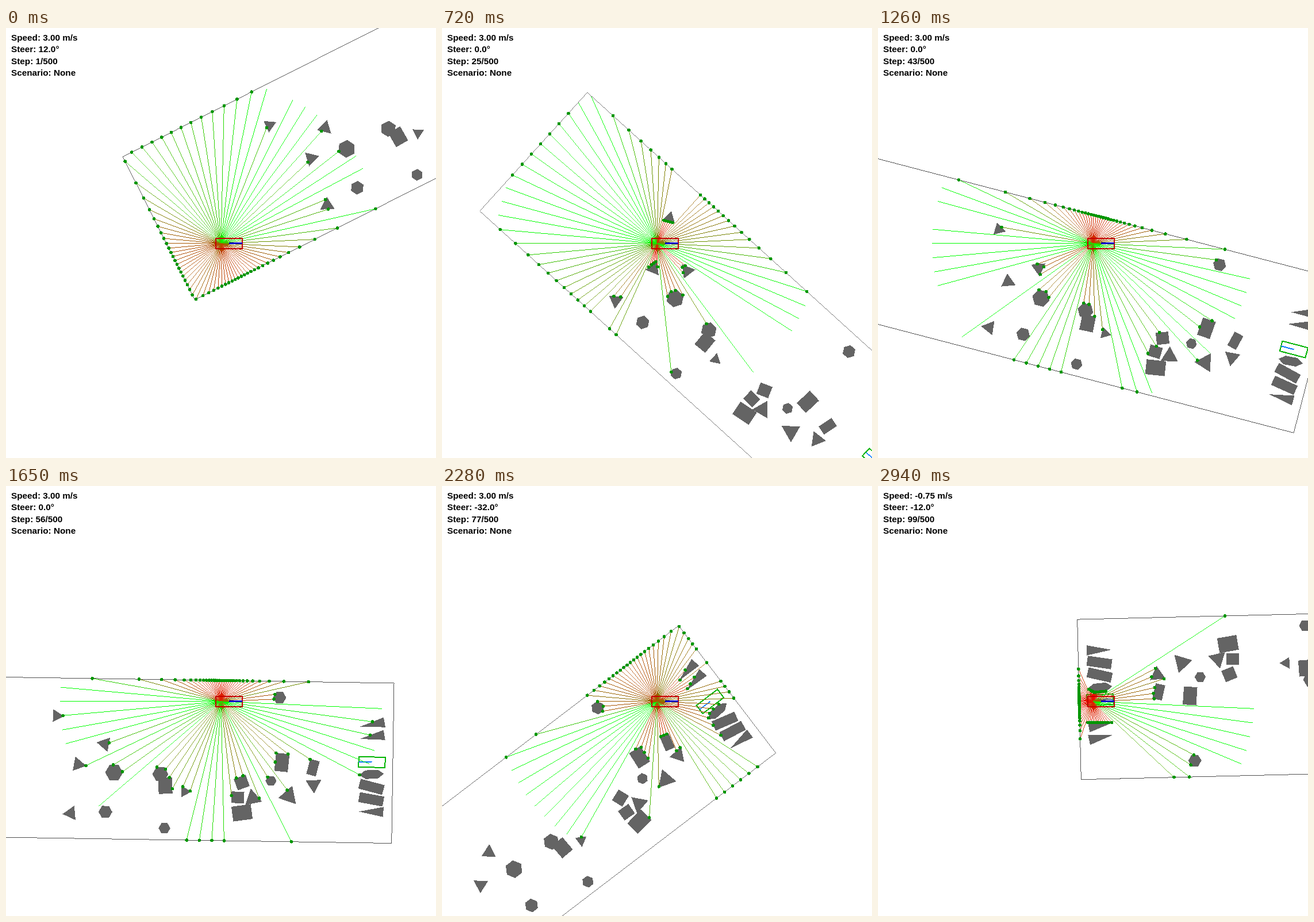
Write an HTML page that moves like this. It is 748 px wide and 748 px high and loops after 2.97 s.

```html
<!DOCTYPE html>
<html lang="en">
<head>
<meta charset="utf-8">
<title>Parking simulation</title>
<style>
  html, body { margin: 0; width: 100%; height: 100%; overflow: hidden; background: #fff; }
  svg { display: block; }
  text { font: bold 15.3px "Liberation Sans", Arial, sans-serif; white-space: pre; }
</style>
</head>
<body>
<svg id="stage" width="748" height="748" shape-rendering="crispEdges"></svg>
<script>
const stage = document.getElementById('stage');
const STEPS = 99, STEP_MS = 30;
const PX_PER_SPEED = 9.32 / 3;         // pixels driven per step at 1 m/s
const CRUISE = 9.32;                   // pixels driven per step at full speed
const LOT = [838.6, 278.6];
const RAYS = 71, RANGE = 280;
const CAR = [374, 374.9];              // rear axle on the stage
const rad = d => d * Math.PI / 180;
const mix = (a, b, u) => a + (b - a) * u;

// Easing of the distance driven between two key poses
const steady = u => u;
const brake = u => u * (2 - u);
const shunt = u => { const w = 2 * u - 1; return 0.5 + w * (4 - Math.abs(w) ** 3) / 6; };

// Key poses of the rear axle in the lot; a negative travel is driven in reverse.
const key = (step, x, y, heading, steer, travel, ease = steady) =>
  ({ step, x, y, heading, steer, travel, ease });
const route = [
  key(1, 84.7, 211.6, 26.75, 12),
  key(25, 266.3, 113.3, -42.2, 0),
  key(43, 417.6, 48.1, -14.63, 0),
  key(56, 538.1, 36.6, -0.88, 0),
  key(68, 648.9, 52.7, 5.3, -2),
  key(86, 755.4, 148, 105.7, -30, 14, brake),
  key(89, 750.6, 161.2, 113, 0, -76, shunt),
  key(99, 814.7, 135.2, 181.37, -12)
];

// A cubic through the key poses, tangent to each heading
function driveTo(n) {
  const i = Math.max(1, route.findIndex(k => k.step >= n));
  const a = route[i - 1], b = route[i], steps = b.step - a.step;
  const travel = a.travel ?? CRUISE * steps, gear = Math.sign(travel);
  const u = (n - a.step) / steps, p = a.ease(u);
  const axis = (p0, p1, trig) => {
    const d = p1 - p0, t0 = travel * trig(rad(a.heading)), t1 = travel * trig(rad(b.heading));
    const c2 = 3 * d - 2 * t0 - t1, c3 = t0 + t1 - 2 * d;
    return [p0 + p * (t0 + p * (c2 + p * c3)), t0 + p * (2 * c2 + 3 * p * c3)];
  };
  const [x, dx] = axis(a.x, b.x, Math.cos), [y, dy] = axis(a.y, b.y, Math.sin);
  const bend = -3 * gear * (b.heading - a.heading) / steps;
  return {
    x, y,
    heading: Math.atan2(gear * dy, gear * dx),
    speed: Math.round(4 * travel * (p - a.ease(u - 1 / steps)) / PX_PER_SPEED) / 4,
    steer: 2 * Math.round((mix(a.steer, b.steer, u) + bend * Math.sin(Math.PI * u)) / 2)
  };
}

// Outlines in a unit box: triangle pointing left, square, hexagon
const outlines = {
  3: [[-0.5, 0], [0.5, -0.5], [0.5, 0.5]],
  4: [[-0.5, -0.5], [0.5, -0.5], [0.5, 0.5], [-0.5, 0.5]],
  6: [0, 1, 2, 3, 4, 5].map(k => [Math.cos(rad(60 * k)) / 2, Math.sin(rad(60 * k)) / 2])
};

function shape(sides, x, y, w, h, turn = 0) {
  const c = Math.cos(rad(turn)), s = Math.sin(rad(turn));
  return outlines[sides].map(([px, py]) =>
    [x + px * w * c - py * h * s, y + px * w * s + py * h * c]);
}

const walls = shape(4, LOT[0] / 2, LOT[1] / 2, ...LOT);
const obstacles = [
  // triangles: x, y, side, turn
  ...[[256, 66, 22, 182], [333.4, 112.8, 25, 10], [289, 152.5, 25, -50], [276.2, 235.4, 25, -6],
    [480.2, 194.2, 20, 180], [595, 200, 30, 78], [654, 200, 32.6, -12], [701.8, 182.7, 27, -94]
  ].map(([x, y, side, turn]) => shape(3, x, y, side * 0.866, side, turn)),
  // boxes: x, y, width, height, turn
  ...[[443.5, 184.5, 24, 28, -3], [569.7, 203, 22, 20, 2], [576.3, 177, 22, 21, -21],
    [577.6, 229.6, 34, 26, -8.5], [645.7, 141, 23.5, 31.5, 5], [699.9, 149.2, 17, 27, 14]
  ].map(box => shape(4, ...box)),
  // hexagons: x, y, diameter
  ...[[354, 163, 31], [340, 231.7, 24], [434.5, 164.5, 28], [443, 258.4, 20.6],
    [627.2, 173.3, 19.4], [640, 28.2, 23]
  ].map(([x, y, size]) => shape(6, x, y, size, size)),
  // parked row with two slots left free: slot, sides, turn
  ...[[0, 3, -11], [1, 3, -10], [4, 6, -4], [5, 4, 14], [6, 4, 9.5], [7, 3, 0]
  ].map(([slot, sides, turn]) => shape(sides, 802, 72.5 + 21.7 * slot, 43, 17.5, turn))
];

const sidesOf = p => p.map((a, i) => [a, p[(i + 1) % p.length]]);

function castRay([x, y], dx, dy, edges) {
  let best = RANGE;
  for (const [[ax, ay], [bx, by]] of edges) {
    const ex = bx - ax, ey = by - ay, det = dx * ey - dy * ex;
    if (!det) continue;
    const r = ((ax - x) * ey - (ay - y) * ex) / det;
    const s = ((ax - x) * dy - (ay - y) * dx) / det;
    if (r > 0 && r < best && s >= 0 && s <= 1) best = r;
  }
  return best;
}

// Weight counts pixels across the longer axis, so slanted lines stay thin.
function line([x0, y0], [x1, y1], color, weight = 1) {
  const dx = x1 - x0, dy = y1 - y0;
  const width = weight * Math.max(Math.abs(dx), Math.abs(dy)) / Math.hypot(dx, dy);
  return `<path d="M${x0} ${y0}L${x1} ${y1}" stroke="${color}" stroke-width="${width}"/>`;
}
const polygon = (points, style) => `<polygon points="${points.join(' ')}" ${style}/>`;

// Car outline about its rear axle, with a line from the middle to the nose
function car(project, body, nose, weight) {
  return polygon(shape(4, 14, 0, 46, 18).map(project), `fill="none" stroke="${body}" stroke-width="2"`)
    + line(project([14, 0]), project([37, 0]), nose, weight);
}

function scan(edges) {
  let out = '';
  for (let k = 0; k < RAYS; k++) {
    const a = Math.PI + k * 2 * Math.PI / RAYS, dx = Math.cos(a), dy = Math.sin(a);
    const r = castRay(CAR, dx, dy, edges), g = Math.round(255 * r / RANGE);
    const end = [CAR[0] + dx * r, CAR[1] + dy * r];
    out += line(CAR, end, `rgb(${255 - g},${g},0)`);
    if (r < RANGE) out += `<circle cx="${end[0]}" cy="${end[1]}" r="2.8" fill="#009600"/>`;
  }
  return out;
}

function draw(n) {
  const { x, y, heading, speed, steer } = driveTo(n);
  const c = Math.cos(heading), s = Math.sin(heading);
  const view = ([px, py]) =>
    [CAR[0] + (px - x) * c + (py - y) * s, CAR[1] + (py - y) * c - (px - x) * s];
  const blocks = obstacles.map(p => p.map(view));
  const fence = sidesOf(walls.map(view));
  const labels = [
    `Speed: ${speed.toFixed(2)} m/s`, `Steer: ${steer.toFixed(1)}°`,
    `Step: ${n}/500`, 'Scenario: None'
  ];
  stage.innerHTML = [
    ...blocks.map(p => polygon(p, 'fill="#646464"')),
    ...fence.map(([a, b]) => line(a, b, '#505050')),
    car(([px, py]) => view([816.2 - px, 138.1 - py]), '#00b400', '#0078ff', 2),
    scan([...fence, ...blocks.flatMap(sidesOf)]),
    car(([px, py]) => [CAR[0] + px, CAR[1] + py], '#c80000', '#0000c8', 3),
    ...labels.map((t, i) => `<text x="9" y="${21.5 + 20.5 * i}">${t}</text>`)
  ].join('');
}

let shown = 0;
function tick() {
  const n = Math.floor(performance.now() / STEP_MS) % STEPS + 1;
  if (n !== shown) draw(shown = n);
  requestAnimationFrame(tick);
}
tick();
</script>
</body>
</html>
```
